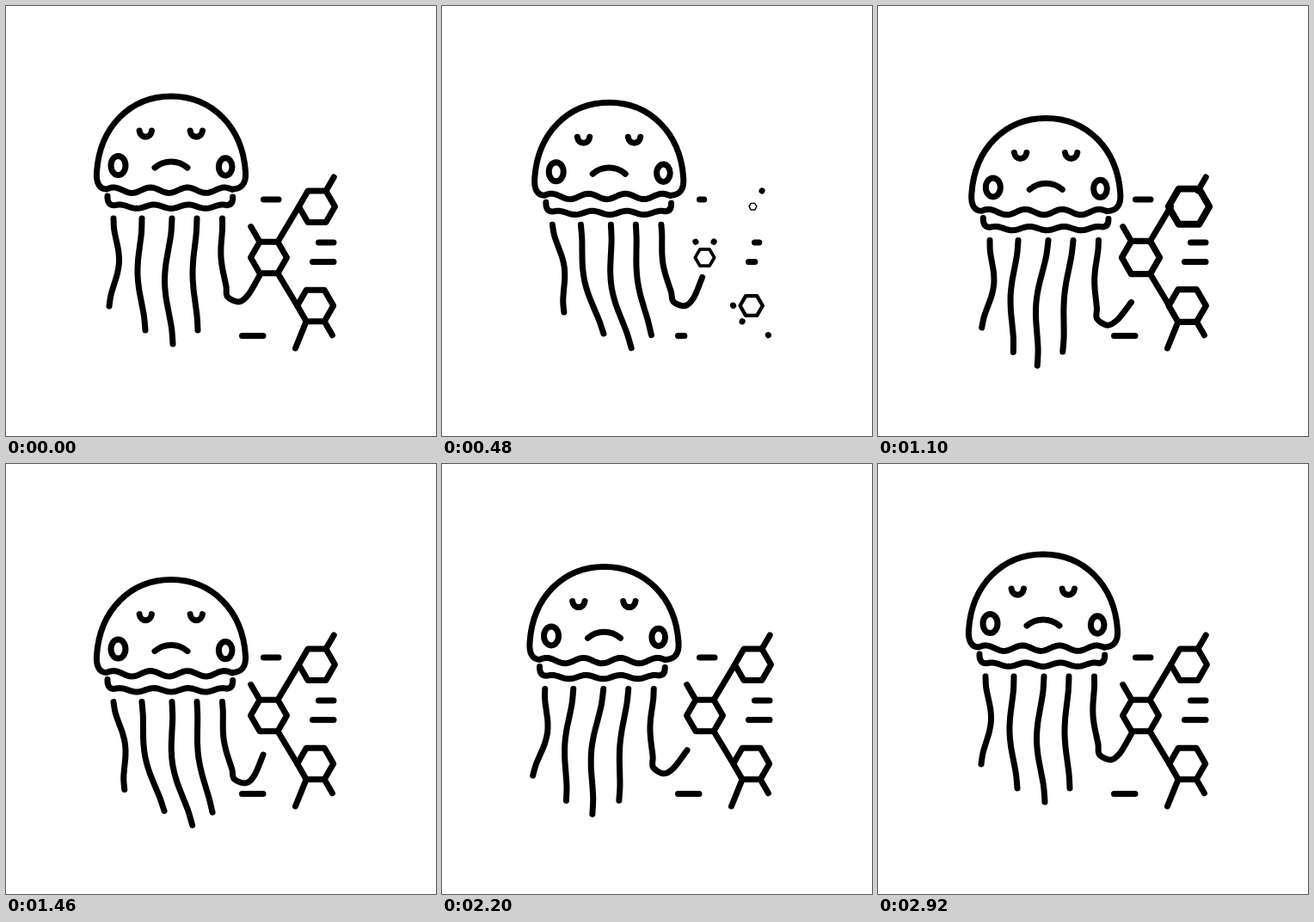
Animation, 500 px wide and 500 px high, one loop 2960 ms. Source, as an HTML page with a canvas:

```html
<!DOCTYPE html>
<html lang="en">
<head>
<meta charset="utf-8">
<title>Jellyfish</title>
<style>
  html, body { margin: 0; width: 100%; height: 100%; overflow: hidden; background: #fff; }
  canvas { display: block; width: 500px; height: 500px; }
</style>
</head>
<body>
<canvas id="stage" width="500" height="500"></canvas>
<script>
const ctx = document.getElementById('stage').getContext('2d');
const LOOP = 2960, MOVE = 2920, TAU = Math.PI * 2;

const TENTACLES = [
  { x: 125, length: 102, drift: -5, belly: 9 },
  { x: 158, length: 130, drift: 4, belly: -7 },
  { x: 193, length: 146, drift: 1, belly: -9 },
  { x: 222, length: 130, drift: 1, belly: -5.5 },
  { x: 251.5, length: 91, drift: 6, belly: -4.5, hook: [[19, 97], [30, 89], [43, 67]] }
];

const TOP = { x: 361.5, y: 233.2, start: 350 };
const MID = { x: 305.5, y: 292.5, start: 255 };
const LOW = { x: 359.7, y: 348.5, start: 230 };

// Corner k of a ring, clockwise from the right, or a point further out
const corner = (ring, k, out = 0) => [
  ring.x + (21 + out) * Math.cos(k * TAU / 6),
  ring.y + (21 + out) * Math.sin(k * TAU / 6)
];

// Each line shrinks towards its first end
const BONDS = [
  [corner(TOP, 5), corner(TOP, 5, 18.5)],
  [corner(MID, 4), corner(MID, 4, 20.5)],
  [corner(MID, 5), corner(TOP, 3)],
  [corner(LOW, 3), corner(MID, 1)],
  [corner(LOW, 2), [336.5, 398]],
  [corner(LOW, 1, 18.5), corner(LOW, 1)]
];
const DASHES = [[299.5, 225, 17.5], [363.5, 275, 17.5], [356.5, 297.5, 24.5], [274.5, 383.5, 24.5]]
  .map(([x, y, length]) => [[x, y], [x + length, y]]);

const ease = p => p * p * (3 - 2 * p);

function keyed(t, times, values) {
  const i = times.findIndex(time => t < time);
  if (i < 0) return values[values.length - 1];
  if (i === 0) return values[0];
  const p = (t - times[i - 1]) / (times[i] - times[i - 1]);
  return values[i - 1] + (values[i] - values[i - 1]) * ease(p);
}

function stroke(build) {
  ctx.beginPath();
  build();
  ctx.stroke();
}

function shifted(x, y, draw) {
  ctx.save();
  ctx.translate(x, y);
  draw();
  ctx.restore();
}

// Smooth curve through points
function spline(pts) {
  const at = i => pts[Math.max(0, Math.min(pts.length - 1, i))];
  ctx.moveTo(...pts[0]);
  for (let i = 0; i < pts.length - 1; i++) {
    const [a, b, c, d] = [at(i - 1), at(i), at(i + 1), at(i + 2)];
    ctx.bezierCurveTo(b[0] + (c[0] - a[0]) / 6, b[1] + (c[1] - a[1]) / 6,
      c[0] - (d[0] - b[0]) / 6, c[1] - (d[1] - b[1]) / 6, ...c);
  }
}

// Scalloped edge with a crest at the given x
function scallop(from, to, y, height, crest, period) {
  const steps = 60;
  for (let i = 0; i <= steps; i++) {
    const x = from + (to - from) * i / steps;
    ctx.lineTo(x, y - height * Math.cos((x - crest) * TAU / period));
  }
}

function head() {
  stroke(() => {
    ctx.moveTo(105.5, 193);
    ctx.bezierCurveTo(109, 140, 145, 105, 192, 105);
    ctx.bezierCurveTo(239, 105, 275, 140, 278.5, 193);
    ctx.bezierCurveTo(279.5, 206, 274, 213, 263, 213);
    scallop(263, 117, 214.2, 3.2, 125, 43);
    ctx.bezierCurveTo(109, 213, 104.5, 206, 105.5, 193);
    ctx.closePath();
  });
  for (const x of [162.3, 221.3]) {
    stroke(() => {
      ctx.moveTo(x - 7.2, 145);
      ctx.bezierCurveTo(x - 6, 154.5, x + 6, 154.5, x + 7.2, 145);
    });
  }
  stroke(() => ctx.ellipse(130.5, 185.5, 8.5, 11, 0, 0, TAU));
  stroke(() => ctx.ellipse(255.2, 187, 7.8, 10.2, 0, 0, TAU));
  stroke(() => {
    ctx.moveTo(173, 188);
    ctx.bezierCurveTo(184, 178.5, 200, 178.5, 211, 188);
  });
}

function lace() {
  stroke(() => {
    ctx.moveTo(118, 221);
    ctx.quadraticCurveTo(117.5, 232, 126, 231.8);
    scallop(127, 257, 233.2, 2.2, 132, 40);
    ctx.quadraticCurveTo(264, 231, 263.7, 222);
  });
}

function restPoints({ x, length, drift, belly, hook = [] }) {
  const pts = [];
  for (let i = 0; i <= 8; i++) {
    const u = i / 8;
    pts.push([x + drift * u + belly * Math.sin(Math.PI * u) ** 2, 247 + length * u]);
  }
  return pts.concat(hook.map(([dx, dy]) => [x + dx, 247 + dy]));
}

// Turns each piece of the strand a little more than the one above it
function bend(pts, angle) {
  let [x, y] = pts[0];
  return pts.map((p, i) => {
    if (i) {
      const dx = p[0] - pts[i - 1][0], dy = p[1] - pts[i - 1][1];
      const turn = angle * (.6 + .8 * i / (pts.length - 1));
      x += dx * Math.cos(turn) + dy * Math.sin(turn);
      y += dy * Math.cos(turn) - dx * Math.sin(turn);
    }
    return [x, y];
  });
}

function tentacle(t, shape, i) {
  const lead = 70 - 35 * i;
  const times = [0, 480 - lead, 960 - lead, 1450 - lead, 1930 - lead, 2560 - lead];
  const swing = keyed(t, times, [0, 1, -1, 1, -1, 0]);
  stroke(() => spline(bend(restPoints(shape), swing * (.195 - .0225 * i))));
}

function ring(t, { x, y, start }) {
  const size = keyed(t, [0, start, start + 510, start + 970], [1, 0, 1.28, 1]);
  if (size < .005) return;
  shifted(x, y, () => {
    ctx.scale(size, size);
    stroke(() => {
      for (let k = 0; k < 6; k++) ctx.lineTo(...corner({ x: 0, y: 0 }, k));
      ctx.closePath();
    });
  });
}

function trimmed(t, [[x1, y1], [x2, y2]], least) {
  const p = keyed(t, [0, 450, 490, 980], [1, least, least, 1]);
  stroke(() => {
    ctx.moveTo(x1, y1);
    ctx.lineTo(x1 + (x2 - x1) * p, y1 + (y2 - y1) * p);
  });
}

function draw(t) {
  const a = TAU * t / MOVE;
  const sway = Math.sin(a) - .25 * Math.sin(2 * a);
  const drop = 14.8 * (1 - Math.cos(a));

  ctx.fillStyle = '#fff';
  ctx.fillRect(0, 0, 500, 500);
  ctx.strokeStyle = '#000';
  ctx.lineWidth = 7;
  ctx.lineCap = ctx.lineJoin = 'round';

  shifted(3.5 * sway, drop, head);
  shifted(4.5 * sway, drop, lace);
  shifted(5.3 * sway, drop, () => TENTACLES.forEach((s, i) => tentacle(t, s, i)));
  [TOP, MID, LOW].forEach(r => ring(t, r));
  BONDS.forEach(b => trimmed(t, b, .01));
  DASHES.forEach(d => trimmed(t, d, .3));
}

const begin = performance.now();
function tick() {
  draw(Math.min((performance.now() - begin) % LOOP, MOVE));
  requestAnimationFrame(tick);
}
tick();
</script>
</body>
</html>
```
